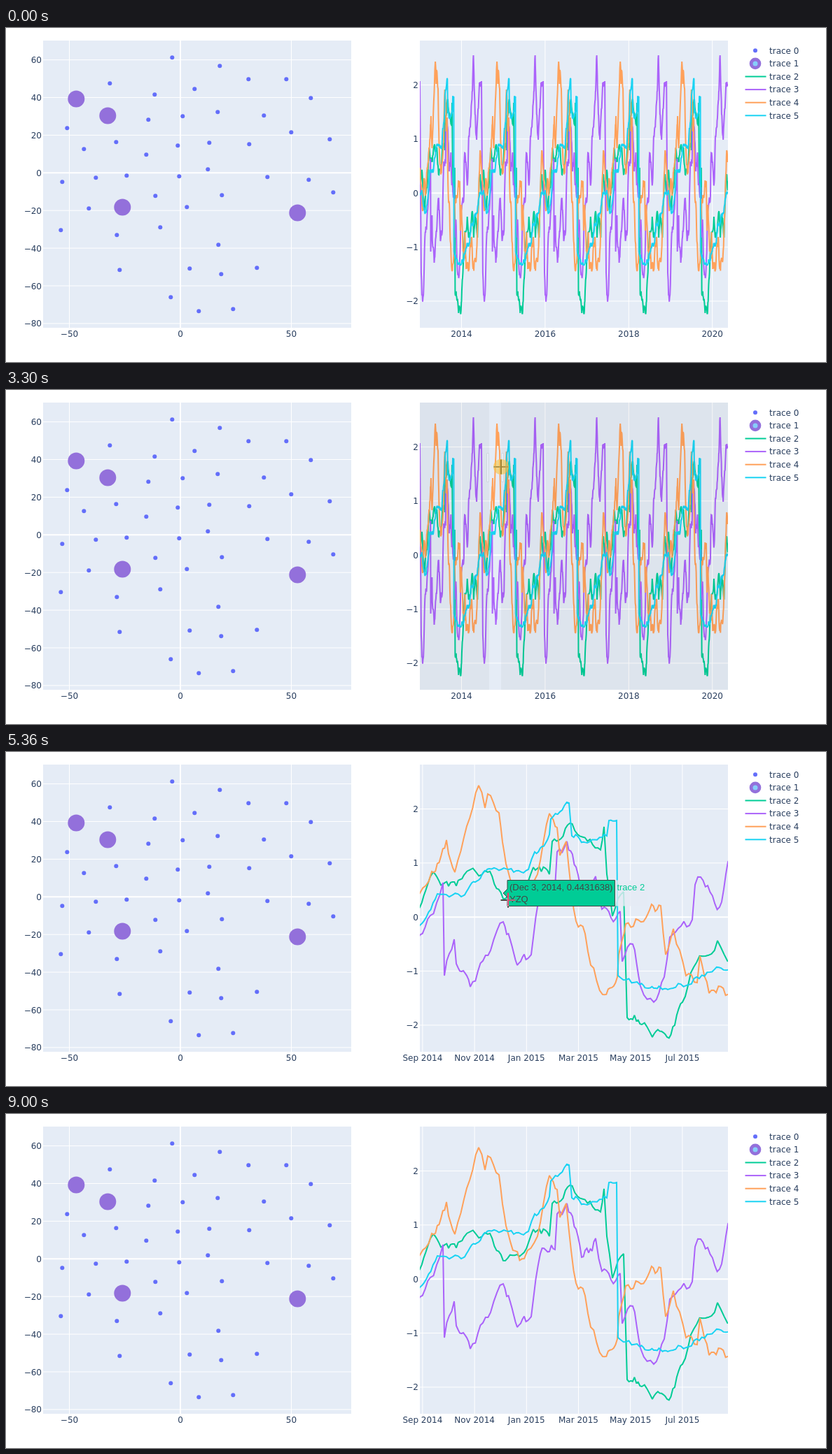
An HTML page that plays this animation: 1171x478 px, repeating every 9810 ms.

```html
<!DOCTYPE html>
<html lang="en">
<head>
<meta charset="utf-8">
<title>Linked charts</title>
<style>
html, body { margin: 0; width: 100%; height: 100%; overflow: hidden; background: #fff; }
svg { display: block; width: 1171px; height: 478px; font: 12px "DejaVu Sans", sans-serif; fill: #2a3f5f; }
.tip { font: 13px "Liberation Sans", sans-serif; }
.line { fill: none; stroke-width: 2; stroke-miterlimit: 2; }
#cross { stroke: #fff; mix-blend-mode: difference; }
</style>
</head>
<body>
<svg id="stage" viewBox="0 0 1171 478"></svg>
<script>
const LOOP = 9810, PERIOD = 658, ORIGIN = 510, SCALE = 0.1338;
const BLUE = '#636efa', PURPLE = '#9370db', SKY = '#87cefa';
const TOP = 18, BOTTOM = 429, LEFT = 591, RIGHT = 1031;

const dots = [
  237,42, 305,54, 148,79, 346,73, 400,73, 212,95, 269,87, 435,100, 203,131, 252,126, 302,120,
  368,125, 87,143, 157,163, 245,168, 290,164, 347,166, 407,149, 462,159, 111,173, 200,181, 288,202,
  80,220, 128,214, 172,211, 247,212, 373,213, 432,217, 118,258, 213,240, 308,239, 258,256, 467,235,
  78,289, 158,296, 220,285, 303,310, 162,346, 262,344, 307,352, 358,343, 235,385, 275,405, 324,402];
const bigDots = [100,101, 145,125, 166,256, 416,264];

// Turning points of one period, in zoomed-in pixels: x, y, ...
const green = [
  510,236, 535,207, 560,260, 591,222, 602,190, 610,172, 632,192, 654,176, 688,172, 713,210, 740,198,
  753,165, 776,175, 780,128, 805,102, 834,125, 849,140, 854,107, 858,175, 866,235, 882,200, 887,380,
  908,390, 923,408, 944,408, 966,358, 982,308, 1016,270, 1035,300, 1070,262, 1085,300, 1100,268,
  1125,300, 1145,212];
const violet = [
  510,76, 524,350, 532,382, 548,382, 564,300, 591,262, 606,234, 624,187, 626,320, 640,268, 643,303,
  663,336, 692,284, 710,243, 730,305, 750,290, 763,200, 784,194, 787,143, 801,128, 822,205, 842,178,
  851,225, 877,228, 880,300, 895,275, 906,335, 925,358, 940,322, 948,265, 980,240, 984,190, 992,179,
  1019,222, 1031,157, 1071,90, 1082,39, 1093,95, 1116,160, 1146,78];
const orange = [
  510,200, 540,262, 555,215, 570,240, 591,202, 608,171, 629,126, 641,172, 675,48, 684,80, 688,60,
  704,87, 714,160, 740,207, 759,175, 776,88, 787,108, 791,148, 800,128, 807,195, 814,242, 827,260,
  835,305, 852,347, 873,322, 875,290, 885,246, 914,237, 935,220, 942,290, 953,253, 971,320, 987,330,
  991,292, 1004,345, 1031,347, 1064,300, 1079,345, 1108,335, 1153,175];
const cyan = [
  510,236, 530,232, 565,266, 591,248, 616,203, 650,207, 690,167, 718,168, 746,168, 755,143, 776,118,
  778,96, 804,73, 808,120, 830,130, 858,120, 861,98, 872,98, 874,320, 905,333, 945,340, 975,333,
  1005,315, 1031,312, 1060,280, 1110,265, 1150,235];
const series = [
  { color: '#00cc96', noise: 4, pts: green }, { color: '#ab63fa', noise: 5, pts: violet },
  { color: '#ffa15a', noise: 5, pts: orange }, { color: '#19d3f3', noise: 2.5, pts: cyan }];

// Pointer path: time, x, y
const path = [
  [70,980,160], [170,800,353], [360,387,300], [560,387,300], [820,309,240], [960,309,240],
  [1190,416,258], [1270,416,258], [1470,587,240], [1610,627,240], [1700,627,240], [1950,650,298],
  [2480,692,112], [3090,691,111], [3300,707,110], [3540,748,114], [4240,748,114], [4690,723,165],
  [5030,723,165], [5360,717,212], [5740,755,274], [6070,755,274], [6930,427,256], [7400,427,256],
  [7590,424,265], [8340,430,265], [8450,630,225], [8600,543,240], [8870,543,240], [9000,856,441]];

// Hover labels: start, end, x, y, trace, value, name
const hovers = [
  [820,990, 311,239, 0, '(18.87141, −11.842)', 'PELDARN'],
  [1190,1330, 422,264.5, 1, '(53.00182, −21.225)', 'NELVO'],
  [1600,1800, 616,266.5, 3, '(May 2013, −0.3934943)', 'NELVO'],
  [2440,2900, 680,110, 3, '(Jun 2014, 1.631702)', 'NELVO'],
  [4150,4560, 695.5,108.6, 4, '(Nov 21, 2014, 1.649939)', 'VENDSTEEL'],
  [4560,5180, 714.5,161, 4, '(Dec 8, 2014, 0.9812374)', 'VENDSTEEL'],
  [5180,5560, 710,202, 2, '(Dec 3, 2014, 0.4431638)', 'YZQ'],
  [5560,6140, 752,257, 3, '(Jan 7, 2015, −0.26891)', 'NELVO'],
  [6900,8060, 422,264.5, 1, '(53.00182, −21.225)', 'NELVO']];

const clicks = [[2950, 4150], [7080, 7330]];
const colors = [BLUE, SKY, ...series.map(s => s.color)];

const pairs = list => list.flatMap((x, i) => i % 2 ? [] : [[x, list[i + 1]]]);
const text = (x, y, s, anchor = 'start', extra = '') =>
  `<text x="${x}" y="${y}" text-anchor="${anchor}" ${extra}>${s}</text>`;
const rect = (x, y, w, h, fill) => `<rect x="${x}" y="${y}" width="${w}" height="${h}" fill="${fill}"/>`;
const disc = (x, y, r, fill) => `<circle cx="${x}" cy="${y}" r="${r}" fill="${fill}"/>`;
const stroke = (d, color, width) => `<path d="${d}" stroke="${color}" stroke-width="${width}"/>`;

function random(seed) {
  return () => (seed = seed * 16807 % 2147483647) / 2147483647;
}

// Midpoint displacement between turning points
function roughen({ pts, noise }, seed) {
  const rnd = random(seed), keys = pairs(pts), out = [];
  function split([x1, y1], [x2, y2]) {
    const dx = x2 - x1;
    if (dx < 5) return out.push([x1, y1]);
    const mid = [(x1 + x2) / 2, (y1 + y2) / 2 + (rnd() - 0.5) * noise * Math.sqrt(dx)];
    split([x1, y1], mid);
    split(mid, [x2, y2]);
  }
  rnd();
  keys.forEach((p, i) => split(p, keys[i + 1] || [ORIGIN + PERIOD, keys[0][1]]));
  return out;
}

function seriesLines(periods, mapX) {
  return series.map((s, i) => {
    const day = roughen(s, 4001 + 977 * i), all = [];
    for (let k = 0; k < periods; k++)
      day.forEach(([x, y]) => all.push(mapX(x + k * PERIOD).toFixed(1) + ',' + y.toFixed(1)));
    return `<polyline class="line" stroke="${s.color}" points="${all.join(' ')}"/>`;
  }).join('');
}

const xGrid = (ticks, zero) => ticks.map(([x, s]) =>
  stroke(`M${x},${TOP}V${BOTTOM}`, '#fff', s === zero ? 2 : 1) + text(x, 441.5, s, 'middle')).join('');

function yGrid(x1, x2, first, step, top, gap, count) {
  let out = '';
  for (let i = 0; i < count; i++) {
    const v = first - step * i, y = top + gap * i;
    out += stroke(`M${x1},${y}H${x2}`, '#fff', v ? 1 : 2) + text(x1 - 2, y + 4.5, v < 0 ? '−' + -v : v, 'end');
  }
  return out;
}

const view = (id, ticks, lines) =>
  `<g id="${id}">${xGrid(ticks)}<g clip-path="url(#plot)">${lines}</g></g>`;

const legend = colors.map((c, i) => {
  const y = 32.3 + 18.6 * i;
  const mark = i === 0 ? disc(1070, y, 3, c)
    : i === 1 ? disc(1070, y, 8.3, PURPLE) + disc(1070, y, 3.5, SKY)
    : stroke(`M1055.5,${y}h30`, c, 2);
  return mark + text(1090, y + 4.3, 'trace ' + i);
}).join('');

const pen = document.createElement('canvas').getContext('2d');
pen.font = '13px "Liberation Sans", sans-serif';

function hoverLabel([, , x, y, n, value, name]) {
  const c = colors[n], w = Math.max(...[value, name].map(s => pen.measureText(s).width)) + 6;
  const ink = n ? '#444' : '#fff', tag = 'trace ' + n;
  return `<g class="tip" transform="translate(${x} ${y})" display="none">
    <g opacity=".8">${rect(6 + w, -18.5, pen.measureText(tag).width + 6, 37, '#e5ecf6')}</g>
    <path d="M0,0L6,6v12.5h${w}v-37H6V-6Z" fill="${c}" stroke="${ink}"/>
    ${text(9, -3.6, value, 'start', `fill="${ink}"`)}${text(9, 12.8, name, 'start', `fill="${ink}"`)}
    ${text(9 + w, -3.6, tag, 'start', `fill="${c}"`)}</g>`;
}

const years = [2014, 2016, 2018, 2020].map((s, i) => [650.5 + 119.4 * i, s]);
const months = ['Sep 2014', 'Nov 2014', 'Jan 2015', 'Mar 2015', 'May 2015', 'Jul 2015']
  .map((s, i) => [594.9 + 74.2 * i, s]);

const $ = id => document.getElementById(id);
$('stage').innerHTML = `
  <clipPath id="plot"><rect x="${LEFT}" y="${TOP}" width="440" height="411"/></clipPath>
  ${rect(0, 0, 1171, 478, '#fff')}
  ${rect(53, TOP, 440, 411, '#e5ecf6')}${rect(LEFT, TOP, 440, 411, '#e5ecf6')}
  ${xGrid([[90.5, '−50'], [249, '0'], [407.5, '50']], '0')}
  ${yGrid(53, 493, 60, 20, 45.6, 53.9, 8)}${yGrid(LEFT, RIGHT, 2, 1, 81.5, 77.35, 5)}
  ${pairs(dots).map(([x, y]) => disc(x + 0.3, y + 0.3, 3, BLUE)).join('')}
  ${pairs(bigDots).map(([x, y]) => disc(x + 0.3, y + 0.5, 12, PURPLE)).join('')}
  ${view('wide', years, seriesLines(5, x => LEFT + (x - ORIGIN) * SCALE))}
  ${view('close', months, seriesLines(1, x => x))}
  ${legend}
  <g id="zoom"><path id="shade" fill-rule="evenodd" fill="#000" fill-opacity=".3"/>
  <path id="bars" fill="#fff" stroke="#444"/></g>
  <g id="tips">${hovers.map(hoverLabel).join('')}</g>
  <g id="cross"><path d="M-10.5,0h21" stroke-width="1.5"/><path d="M0,-10.5v21" stroke-width="2"/></g>
  <circle id="press" r="11" fill="#f5c542" opacity=".6"/>`;

const tips = [...$('tips').children];
const show = (el, on) => el.setAttribute('display', on ? 'inline' : 'none');
const inside = (t, [a, b]) => t >= a && t < b;

function pointer(t) {
  const i = path.findIndex(p => p[0] > t);
  if (i < 1) return path[i ? path.length - 1 : 0].slice(1);
  const [t1, x1, y1] = path[i - 1], [t2, x2, y2] = path[i], f = (t - t1) / (t2 - t1);
  return [x1 + (x2 - x1) * f, y1 + (y2 - y1) * f];
}

function draw(t) {
  const [x, y] = pointer(t);
  const place = `translate(${x} ${y})`, zoomed = t >= 4150;
  show($('wide'), !zoomed);
  show($('close'), zoomed);
  tips.forEach((el, i) => show(el, inside(t, hovers[i])));
  show($('cross'), inside(t, [70, 9000]));
  show($('press'), clicks.some(c => inside(t, c)));
  $('cross').setAttribute('transform', place);
  $('press').setAttribute('transform', place);

  const dragging = inside(t, [3270, 4150]);
  show($('zoom'), dragging);
  if (dragging) {
    $('zoom').setAttribute('opacity', Math.min(1, (t - 3270) / 250));
    $('shade').setAttribute('d', `M${LEFT},${TOP}H${RIGHT}V${BOTTOM}H${LEFT}ZM690,${TOP}H${x}V${BOTTOM}H690Z`);
    $('bars').setAttribute('d', `M689.5,90.5h-3v41h3ZM${x + 0.5},90.5h3v41h-3Z`);
  }
}

let start;
function tick(now) {
  start ??= now;
  draw((now - start) % LOOP);
  requestAnimationFrame(tick);
}
requestAnimationFrame(tick);
</script>
</body>
</html>
```
